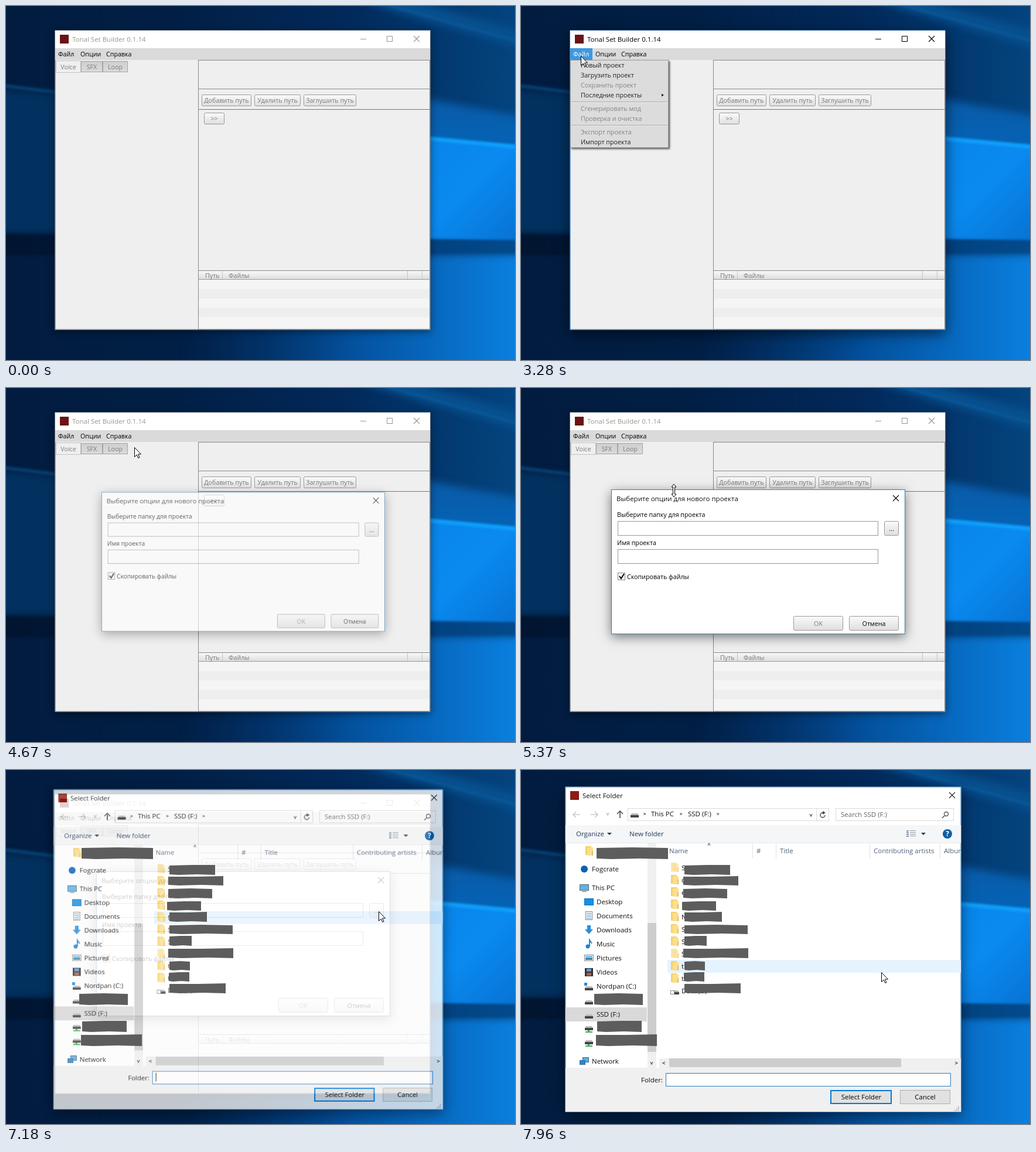
An HTML page with a canvas for the animation above (8 s loop, 869 px wide and 604 px high).

```html
<!DOCTYPE html>
<html lang="ru">
<head>
<meta charset="utf-8">
<title>New project</title>
<style>
html, body { margin: 0; width: 869px; height: 604px; overflow: hidden; background: #021a3c; }
canvas { display: block; }
</style>
</head>
<body>
<canvas id="stage" width="869" height="604"></canvas>
<script>
const W = 869, H = 604, LOOP = 8000;
const SYSTEM = '11.5px "Open Sans", sans-serif', APP = '10.7px "Open Sans", sans-serif';
const stage = document.getElementById('stage').getContext('2d');
let g = stage; // context the helpers draw on

function box(x, y, w, h, fill, stroke) {
  if (fill) { g.fillStyle = fill; g.fillRect(x, y, w, h); }
  if (stroke) { g.strokeStyle = stroke; g.lineWidth = 1; g.strokeRect(x + .5, y + .5, w - 1, h - 1); }
}
function trace(pts) {
  g.beginPath();
  for (let i = 0; i < pts.length; i += 2) g.lineTo(pts[i], pts[i + 1]);
}
function shape(fill, ...pts) { trace(pts); g.fillStyle = fill; g.fill(); }
function line(color, width, ...pts) { trace(pts); g.strokeStyle = color; g.lineWidth = width; g.stroke(); }
function disc(x, y, r, fill) { g.beginPath(); g.arc(x, y, r, 0, 7); g.fillStyle = fill; g.fill(); }
function ring(x, y, r, color, from = 0, to = 7) {
  g.beginPath(); g.arc(x, y, r, from, to); g.strokeStyle = color; g.lineWidth = 1.4; g.stroke();
}
// y is the middle of the capitals
function text(s, x, y, color = '#111', font = SYSTEM, align = 'left') {
  g.font = font; g.textAlign = align; g.fillStyle = color; g.fillText(s, x, y + 4);
}
function fade(x0, y0, x1, y1, ...colors) {
  const f = g.createLinearGradient(x0, y0, x1, y1);
  colors.forEach((c, i) => f.addColorStop(i / (colors.length - 1), c));
  return f;
}
function button(x, y, w, h, label, color = '#777', pressed = false) {
  g.beginPath(); g.roundRect(x + .5, y + .5, w - 1, h - 1, 2);
  g.fillStyle = pressed ? '#cfcfcf' : fade(0, y, 0, y + h, '#fbfbfb', '#dedede');
  g.fill(); g.strokeStyle = '#999'; g.lineWidth = 1; g.stroke();
  text(label, x + w / 2, y + h / 2, color, APP, 'center');
}
function cross(x, y, r, color) {
  line(color, 1.1, x - r, y - r, x + r, y + r);
  line(color, 1.1, x - r, y + r, x + r, y - r);
}
function chevron(x, y, dx, dy, color = '#555') {
  line(color, 1.3, x - dx - dy, y - dy - dx, x + dx, y + dy, x - dx + dy, y - dy + dx);
}
function panel(x, y, w, h, fill, border, blur, alpha, offset) {
  g.save();
  g.shadowColor = `rgba(0,0,0,${alpha})`; g.shadowBlur = blur; g.shadowOffsetY = offset;
  box(x, y, w, h, fill);
  g.restore();
  box(x, y, w, h, null, border);
}
function layer(draw) {
  const canvas = document.createElement('canvas'), before = g;
  canvas.width = W; canvas.height = H;
  g = canvas.getContext('2d');
  draw();
  g = before;
  return canvas;
}

function drawDesktop() {
  box(0, 0, W, H, fade(0, 0, W, 0, '#021c3f', '#011f45', '#02295a', '#04447f'));
  g.filter = 'blur(7px)';
  shape('#02315f', -20, 140, 110, 152, 110, 388, -20, 388);
  shape('#07508f', 600, -10, 690, -10, 890, 45, 890, 75);
  shape(fade(0, 150, 0, 235, '#0a5aa6', '#0562b4'), 690, 153, 890, 190, 890, 260, 690, 240);
  box(300, 424, 600, 200, fade(300, 0, W, 0, 'rgba(2,50,105,0)', '#03509c', '#0a7fdf'));
  g.filter = 'blur(2px)';
  line('#0a4a82', 4, -10, 135, 100, 149);
  line('#0d5b9c', 3, 640, -5, 880, 62);
  shape(fade(700, 230, 869, 400, '#0884e8', '#0a8af0', '#0873d4'), 690, 222, 880, 239, 880, 402, 690, 399);
  line('#10a4ff', 6, 690, 223, 880, 241);
  shape(fade(0, 0, W, 0, '#011530', '#011a3c', '#023a72', '#034a8c'), -9, 389, 880, 400, 880, 421, -9, 425);
  g.filter = 'none';
}

function drawApp(active) {
  const ink = active ? '#000' : '#98988c', grey = '#7a7a7a';
  panel(83.5, 41.5, 641, 511, '#efefef', active ? '#1b6fc0' : '#5f6870', active ? 22 : 12, active ? .6 : .45, active ? 6 : 3);
  box(84, 42, 640, 30, '#fff');
  box(84, 72, 640, 20, '#dadada');
  box(92, 49, 15, 15, '#6b1414');
  text('Tonal Set Builder 0.1.14', 113, 57, ink);
  line(ink, 1, 605, 56.5, 615, 56.5);
  box(650, 51, 10, 10, null, ink);
  cross(701, 56, 5, ink);
  if (active) box(84, 72, 38, 20, '#4297dc');
  ['Файл', 'Опции', 'Справка'].forEach((s, i) =>
    text(s, [89, 127, 171][i], 82, active && !i ? '#fff' : '#000', APP));

  [['Voice', 85, 43], ['SFX', 128, 37], ['Loop', 165, 43]].forEach(([s, x, w], i) => {
    box(x, i ? 94 : 93, w, i ? 19 : 21, i ? fade(0, 94, 0, 113, '#cecece', '#dcdcdc') : '#efefef', i ? '#a5a5a5' : '#c4c4c4');
    text(s, x + w / 2, 104, grey, APP, 'center');
  });

  box(328, 92, 396, 460, null, '#888');
  box(329, 141, 394, 1, '#8c8c8c');
  box(329, 176, 394, 1, '#777');
  button(334, 151, 85, 20, 'Добавить путь');
  button(424, 151, 79, 20, 'Удалить путь');
  button(508, 151, 90, 20, 'Заглушить путь');
  button(338, 182, 35, 20, '>>');
  box(329, 451, 394, 16, fade(0, 451, 0, 467, '#fafafa', '#dcdcdc'));
  box(329, 451, 394, 1, '#888');
  box(329, 466, 394, 1, '#999');
  for (const x of [369, 685, 710]) box(x, 452, 1, 14, '#c4c4c4');
  text('Путь', 340, 460, grey, APP);
  text('Файлы', 380, 460, grey, APP);
  for (let i = 0; i < 5; i++) box(329, 467 + 16 * i, 394, i < 4 ? 16 : 20, i % 2 ? '#eee' : '#f5f5f5');
}

function drawMenu(hover) {
  g.save();
  g.shadowColor = 'rgba(0,0,0,.65)'; g.shadowBlur = 3; g.shadowOffsetX = g.shadowOffsetY = 2;
  box(84, 92, 168, 150, '#dcdcdc');
  g.restore();
  box(84, 92, 168, 150, null, '#a0a0a0');
  if (hover) box(85, 93, 166, 17, fade(0, 93, 0, 110, '#6bb6f4', '#4a9fe8'), '#3f8fd8');
  const items = ['Новый проект', 'Загрузить проект', '-Сохранить проект', 'Последние проекты',
    '-Сгенерировать мод', '-Проверка и очистка', '-Экспорт проекта', 'Импорт проекта'];
  items.forEach((s, i) => {
    const off = s[0] === '-';
    const y = 101 + 17 * i + (i > 3 ? 6 : 0) + (i > 5 ? 6 : 0);
    text(off ? s.slice(1) : s, 102, y, off ? '#858585' : hover && !i ? '#fff' : '#222', APP);
  });
  shape('#222', 240, 149.5, 244, 152, 240, 154.5);
  for (const y of [163, 203]) { box(86, y, 164, 1, '#a8a8a8'); box(86, y + 1, 164, 1, '#eee'); }
}

function drawProject(pressed) {
  panel(154, 173, 502, 247, '#fff', '#3c7fa8', 18, .5, 5);
  text('Выберите опции для нового проекта', 163, 189);
  cross(640, 188, 5, '#000');
  text('Выберите папку для проекта', 164, 216, '#000', APP);
  text('Имя проекта', 164, 264, '#000', APP);
  box(165, 227, 445, 25, '#fff', '#999');
  box(165, 275, 445, 25, '#fff', '#999');
  button(620, 227, 25, 25, '...', '#000', pressed);
  box(165, 315, 13, 13, '#f8f8f8', '#888');
  line('#000', 2, 168, 321, 171, 325, 176, 317);
  text('Скопировать файлы', 181, 322, '#000', APP);
  button(465, 389, 85, 25, 'OK', '#6f8a6f');
  button(560, 389, 85, 25, 'Отмена', '#000');
}

function folderIcon(x, y) {
  box(x, y - 8, 10, 15, '#f5d06b');
  box(x + 3, y - 6, 10, 14, '#fbdf8d');
  box(x + 11, y, 2, 8, '#e9be55');
}
function driveIcon(x, y, net) {
  shape('#bbb', x + 2, y - 3, x + 12, y - 3, x + 14, y, x, y);
  box(x, y, 14, 4, '#444');
  if (net) { box(x + 5, y + 4, 3, 3, '#3fae49'); box(x + 1, y + 6, 12, 2, '#3fae49'); }
}
const smallIcons = {
  Desktop(x, y) { box(x, y - 6, 16, 12, '#1490e6', '#0b6fb8'); },
  Documents(x, y) {
    box(x + 2, y - 8, 12, 15, '#fff', '#888');
    for (let i = 0; i < 4; i++) box(x + 4, y - 5 + 3 * i, 8, 1, '#4a8fc8');
  },
  Downloads(x, y) { shape('#2b8fdc', x + 5, y - 8, x + 11, y - 8, x + 11, y - 1, x + 15, y - 1, x + 8, y + 7, x + 1, y - 1, x + 5, y - 1); },
  Music(x, y) { disc(x + 6, y + 4, 3.5, '#1a86d8'); line('#1a86d8', 2, x + 9, y + 4, x + 9, y - 7, x + 13, y - 1); },
  Pictures(x, y) { box(x, y - 6, 16, 11, '#fff', '#888'); box(x + 2, y - 4, 12, 4, '#7cc0ee'); box(x + 2, y, 12, 3, '#3b7d9c'); },
  Videos(x, y) { box(x + 1, y - 7, 14, 14, '#333'); box(x + 4, y - 6, 8, 5, '#5a9bd0'); box(x + 4, y + 1, 8, 5, '#a5604a'); },
  'Nordpan (C:)'(x, y) { box(x, y - 6, 5, 5, '#1490e6'); driveIcon(x + 1, y + 3); }
};

function drawFolderPicker(hoverRow, caret) {
  panel(75.5, 28.5, 676, 555, '#fff', '#2878b8', 20, .5, 5);
  box(84, 36, 15, 15, '#8c1c14');
  text('Select Folder', 105, 44);
  cross(736, 43, 5, '#222');

  for (const [x, d, c] of [[95, -1, '#c8c8c8'], [125, 1, '#c8c8c8']]) {
    line(c, 1.5, x - 6, 76, x + 6, 76);
    line(c, 1.5, x + d, 71, x + 6 * d, 76, x + d, 81);
  }
  chevron(148, 75, 0, 2, '#bbb');
  line('#555', 1.7, 169, 82, 169, 70);
  line('#555', 1.7, 164, 75, 169, 70, 174, 75);
  box(182, 65, 344, 22, '#fff', '#d9d9d9');
  box(504, 65, 1, 22, '#d9d9d9');
  driveIcon(187, 77);
  for (const x of [211, 273, 336]) chevron(x, 75, 1.5, 0);
  text('This PC', 222, 75);
  text('SSD (F:)', 285, 75);
  chevron(495, 77, 0, 2);
  ring(515, 77, 4, '#444', 0, 5.2);
  shape('#444', 515, 70, 520, 73, 515, 76);
  box(537, 65, 202, 22, '#fff', '#d9d9d9');
  text('Search SSD (F:)', 546, 76, '#666');
  ring(726, 75, 3.5, '#555');
  line('#555', 1.6, 723, 78, 719, 82);

  box(76, 94, 675, 31, '#f5f6f7');
  box(76, 124, 675, 1, '#e6e8ea');
  text('Organize', 94, 109, '#1e395b');
  shape('#1e395b', 147, 107, 155, 107, 151, 111);
  text('New folder', 185, 109, '#1e395b');
  for (let i = 0; i < 4; i++) { box(658, 103 + 3 * i, 4, 2, '#8a97a5'); box(664, 103 + 3 * i, 10, 1, '#8a97a5'); }
  shape('#1e395b', 683, 107, 691, 107, 687, 111);
  disc(728, 109, 8, '#0b5fa8');
  text('?', 728, 109, '#fff', 'bold 12px "Open Sans", sans-serif', 'center');

  // navigation tree
  folderIcon(110, 138);
  box(76, 405, 139, 24, '#d9d9d9');
  disc(108, 169, 6, '#0a62b5');
  text('Fogcrate', 121, 169);
  box(100, 195, 16, 11, '#59b4ea', '#666');
  box(104, 207, 8, 1, '#666');
  text('This PC', 121, 201);
  Object.keys(smallIcons).forEach((name, i) => {
    smallIcons[name](108, 225 + 24 * i);
    text(name, 129, 225 + 24 * i);
  });
  driveIcon(109, 396);
  driveIcon(109, 420);
  text('SSD (F:)', 129, 417);
  driveIcon(109, 440, true);
  driveIcon(109, 464, true);
  box(105, 490, 11, 9, '#58aee6', '#3a6d98');
  box(100, 495, 10, 8, '#2f86c8', '#3a6d98');
  text('Network', 121, 497);
  box(216, 125, 15, 383, '#f0f0f0');
  box(216, 261, 15, 220, '#cdcdcd');
  chevron(223, 500, 0, 2);

  // file list
  const columns = [['Name', 253, 395], ['#', 402, 435], ['Title', 442, 595], ['Contributing artists', 602, 715]];
  for (const [s, x, end] of columns) { text(s, x, 138, '#4c607a'); box(end, 125, 1, 26, '#e2e2e2'); }
  g.save();
  g.beginPath(); g.rect(715, 125, 36, 30); g.clip();
  text('Album', 722, 138, '#4c607a');
  g.restore();
  chevron(321, 127, 0, -2, '#777');
  box(250, 324 + 21 * (hoverRow - 8), 501, 22, '#e5f3ff');
  [...'Sce NSSStt'].forEach((s, i) => {
    const y = 167 + 21 * i;
    g.globalAlpha = i === 0 || i === 7 ? .55 : 1;
    folderIcon(256, y - 1);
    g.globalAlpha = 1;
    text(s, 274, y);
  });
  driveIcon(256, 379);
  box(255, 376, 7, 7, '#fff', '#888');
  text('Data (D)', 274, 377);
  box(236, 492, 515, 16, '#f0f0f0');
  box(253, 492, 396, 15, '#cdcdcd');
  chevron(244, 500, -2, 0);
  chevron(743, 500, 2, 0);

  box(76, 508, 675, 75, '#f0f0f0');
  text('Folder:', 242, 529, '#111', SYSTEM, 'right');
  box(247, 517, 487, 23, '#fff', '#2a7fc8');
  if (caret) box(253, 520, 1, 15, '#000');
  box(528, 546, 105, 24, '#e1e1e1', '#0078d7');
  box(529, 547, 103, 22, null, '#0078d7');
  text('Select Folder', 581, 558, '#000', SYSTEM, 'center');
  box(647, 546, 86, 24, '#e1e1e1', '#adadad');
  text('Cancel', 690, 558, '#000', SYSTEM, 'center');
  for (let i = 0; i < 3; i++) for (let j = 0; j <= i; j++) box(746 - 3 * j, 574 + 3 * i, 2, 2, '#b5b5b5');
}

// strips hiding private entries: x, y, width, height
const strips = [
  [129, 132, 122, 20], [279, 162, 78, 17], [277, 181, 94, 16], [277, 202, 75, 17], [275, 224, 58, 16],
  [279, 242, 64, 17], [279, 264, 108, 16], [279, 283, 38, 17], [277, 304, 111, 17], [279, 326, 35, 16],
  [278, 345, 35, 16], [279, 364, 96, 17], [125, 381, 83, 20], [130, 428, 76, 19], [128, 451, 104, 20]
];
function drawStrips() {
  strips.forEach(([x, y, w, h], i) => {
    const tilt = i % 3 - 1;
    shape('#5d5d5d', x, y + 1, x + w / 2, y + (tilt > 0 ? 1 : 0), x + w, y + (tilt < 0 ? 1 : 0),
      x + w, y + h, x + w * .6, y + h - 1, x + w * .2, y + h, x, y + h - 1);
  });
}

// pointer runs: time, x, y; at rest at both ends
const STEP = 78.5;
const runs = [
  [[150, 778, 612], [1020, 496, 338], [1880, 128, 113], [2270, 102, 83]],
  [[3202, 102, 83], [3280, 102, 85], [3700, 163, 104], [4060, 219, 101]],
  [[5142, 219, 101], [5370, 259, 174], [6010, 491, 238], [6400, 636, 241]],
  [[7560, 636, 241], [7960, 615, 345]]
];
function pointerAt(time) {
  const run = runs.findLast(r => r[0][0] <= time);
  if (!run) return { x: W, y: H };
  const start = run[0][0], last = run.length - 1;
  const t = Math.min(run[last][0], start + Math.floor((time - start) / STEP + .2) * STEP);
  let i = 0;
  while (i < last - 1 && run[i + 1][0] <= t) i++;
  const a = run[i], b = run[i + 1], span = b[0] - a[0], u = (t - a[0]) / span;
  const speed = (k, axis) => k === 0 || k === last ? 0 :
    (run[k + 1][axis] - run[k - 1][axis]) / (run[k + 1][0] - run[k - 1][0]);
  const at = axis => Math.round(a[axis] + (b[axis] - a[axis]) * u * u * (3 - 2 * u) +
    span * u * (1 - u) * ((1 - u) * speed(i, axis) - u * speed(i + 1, axis)));
  return { x: at(1), y: at(2) };
}

function drawPointer({ x, y }, overProject) {
  const inside = (x0, y0, x1, y1) => overProject && x >= x0 && x < x1 && y >= y0 && y < y1;
  g.save();
  g.translate(x, y);
  if (inside(154, 171, 656, 178)) {
    trace([0, -11, 4, -6, 1.5, -6, 1.5, 6, 4, 6, 0, 11, -4, 6, -1.5, 6, -1.5, -6, -4, -6]);
  } else if (inside(165, 227, 610, 252)) {
    line('#000', 1, -3, -8.5, 3, -8.5);
    line('#000', 1, .5, -8, .5, 9);
    line('#000', 1, -3, 9.5, 3, 9.5);
    g.restore();
    return;
  } else {
    trace([.5, .5, .5, 16.5, 4.3, 13, 6.8, 18.5, 9, 17.5, 6.6, 12, 11.5, 12]);
  }
  g.closePath();
  g.fillStyle = '#fff'; g.fill();
  g.strokeStyle = '#000'; g.lineWidth = 1; g.stroke();
  g.restore();
}

// window opening in five steps: grows slightly while it fades in
function popIn(image, elapsed, cx, cy) {
  const left = 1 - Math.min(1, (Math.floor(elapsed / 72.5) + 1) / 5), scale = 1 - .1 * left * left;
  g.save();
  g.globalAlpha = 1 - left ** 1.8;
  g.translate(cx, cy); g.scale(scale, scale); g.translate(-cx, -cy);
  g.drawImage(image, 0, 0);
  g.restore();
}

const desktop = layer(drawDesktop);
const app = [false, true].map(on => layer(() => drawApp(on)));
const menu = [false, true].map(on => layer(() => drawMenu(on)));
const project = [false, true].map(on => layer(() => drawProject(on)));
const clicks = [[2500, 2650], [4440, 4600], [6860, 7030]];
const MENU = 2500, PROJECT = 4530, PICKER = 7030;

function render(t) {
  const pointer = pointerAt(t), menuOpen = t >= MENU && t < PROJECT;
  g.drawImage(desktop, 0, 0);
  g.drawImage(app[+menuOpen], 0, 0);
  if (menuOpen) {
    g.globalAlpha = t < 2570 ? .4 : t < 2650 ? .8 : 1;
    g.drawImage(menu[+(pointer.y > 93)], 0, 0);
    g.globalAlpha = 1;
  }
  if (t >= PROJECT) popIn(project[+(t >= 6860 && t < PICKER)], t - PROJECT, 405, 296.5);
  if (t >= PICKER) {
    const row = Math.floor((pointer.y - 156.5) / 21);
    popIn(layer(() => drawFolderPicker(row, t < 7720)), t - PICKER, 413.5, 306);
    if (t >= PICKER + 72) drawStrips();
  }
  if (clicks.some(([from, to]) => t >= from && t < to)) disc(pointer.x, pointer.y, 12, 'rgba(35,95,245,.85)');
  drawPointer(pointer, t >= PROJECT && t < PICKER);
}

const begin = performance.now();
(function tick() {
  render((performance.now() - begin) % LOOP);
  requestAnimationFrame(tick);
})();
</script>
</body>
</html>
```
